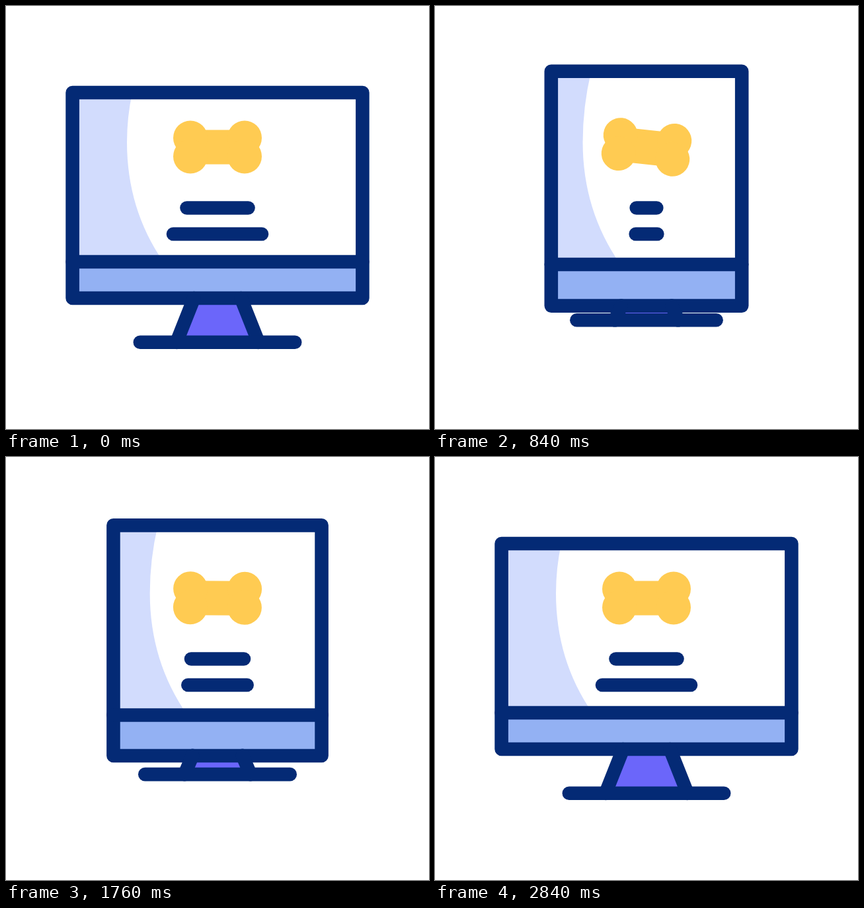
Write an HTML page with a canvas that moves like this. It is 640 px wide and 640 px high and loops after 3000 ms.

```html
<!DOCTYPE html>
<html lang="en">
<head>
<meta charset="utf-8">
<title>Responsive screen</title>
<style>
  html, body { margin: 0; width: 100%; height: 100%; overflow: hidden; background: #fff; }
  canvas { display: block; width: 640px; height: 640px; }
</style>
</head>
<body>
<canvas id="stage" width="640" height="640"></canvas>
<script>
const ctx = document.getElementById('stage').getContext('2d');
const LOOP = 3000, STEP = 40, CX = 320, STROKE = 20.6, WAIST_Y = 206;
const NAVY = '#042a75', SHADE = '#d2dcfd', BAR = '#93b1f3', PURPLE = '#6b66fa', YELLOW = '#ffcb52';

const mix = (a, b, k) => a + (b - a) * k;
const smooth = k => k * k * (3 - 2 * k);
const snap = k => k < 0.5 ? (2 * k) ** 2.25 / 2 : 1 - (2 - 2 * k) ** 2.25 / 2;

// Eased progress from 0 to 1 between two times
const span = (t, from, to, ease = smooth) =>
  ease(Math.min(1, Math.max(0, (t - from) / (to - from))));

// Swings 0 → 1 → 0 → 1 …, turning at each given time
function swing(t, ...times) {
  let sum = 0;
  for (let i = 1; i < times.length; i++) {
    sum += (i % 2 ? 1 : -1) * span(t, times[i - 1], times[i]);
  }
  return sum;
}

// x values are distances from the centre line, except the shaded edge
const desktop = {
  half: 219.4, top: 131, mid: 387, bottom: 442,
  baseHalf: 117.2, baseY: 508.8, legTop: 35.5, legEnd: 62,
  edgeTop: 191, edgeWaist: 183, edgeLow: 238
};
const phone = {
  half: 99.8, top: 83.2, mid: 393, bottom: 459.2,
  baseHalf: 92, baseY: 459.2, legTop: 39.5, legEnd: 41,
  edgeTop: 258, edgeWaist: 243, edgeLow: 301
};

function poseAt(t) {
  const stretch = span(t, 200, 560) - span(t, 2130, 2840);
  const morph = span(t, 558, 1038, snap) - span(t, 1460, 2130);
  const wide = { ...desktop, half: desktop.half + 17.3 * stretch, baseHalf: desktop.baseHalf + 16.8 * stretch };
  const pose = {};
  for (const k in wide) pose[k] = mix(wide[k], phone[k], morph);
  return pose;
}

function line(x0, y0, x1, y1) {
  ctx.beginPath();
  ctx.moveTo(x0, y0);
  ctx.lineTo(x1, y1);
  ctx.stroke();
}

const bar = (half, y) => line(CX - half, y, CX + half, y);

function drawScreen(s) {
  const left = CX - s.half;
  ctx.fillStyle = SHADE;
  ctx.beginPath();
  ctx.moveTo(left, s.top);
  ctx.lineTo(s.edgeTop, s.top);
  ctx.quadraticCurveTo(s.edgeWaist, (s.top + WAIST_Y) / 2, s.edgeWaist, WAIST_Y);
  ctx.quadraticCurveTo(s.edgeWaist, (s.mid + WAIST_Y) / 2 + 11, s.edgeLow, s.mid);
  ctx.lineTo(left, s.mid);
  ctx.fill();
  ctx.fillStyle = BAR;
  ctx.fillRect(left, s.mid, s.half * 2, s.bottom - s.mid);
}

function drawFrame(s) {
  ctx.fillStyle = PURPLE;
  ctx.beginPath();
  ctx.moveTo(CX - s.legTop, s.bottom);
  ctx.lineTo(CX + s.legTop, s.bottom);
  ctx.lineTo(CX + s.legEnd, s.baseY);
  ctx.lineTo(CX - s.legEnd, s.baseY);
  ctx.fill();
  ctx.strokeRect(CX - s.half, s.top, s.half * 2, s.bottom - s.top);
  bar(s.half, s.mid);
  for (const side of [-1, 1]) {
    line(CX + side * s.legTop, s.bottom, CX + side * s.legEnd, s.baseY);
  }
  bar(s.baseHalf, s.baseY);
}

function drawBone(degrees) {
  ctx.save();
  ctx.translate(CX, 213.5);
  ctx.rotate(degrees * Math.PI / 180);
  ctx.fillStyle = YELLOW;
  ctx.fillRect(-41, -26, 82, 52);
  for (const x of [-41, 41]) {
    for (const y of [-14, 14]) {
      ctx.beginPath();
      ctx.arc(x, y, 26, 0, Math.PI * 2);
      ctx.fill();
    }
  }
  ctx.restore();
}

function draw(t) {
  const pose = poseAt(t);
  ctx.fillStyle = '#fff';
  ctx.fillRect(0, 0, 640, 640);
  ctx.strokeStyle = NAVY;
  ctx.lineWidth = STROKE;
  ctx.lineCap = ctx.lineJoin = 'round';
  drawScreen(pose);
  drawFrame(pose);
  drawBone(7 * (span(t, 560, 920) - span(t, 2050, 2560)) - 11.5 * swing(t, 920, 1520, 2050));
  bar(46.5 * (1 - 0.8 * swing(t, 400, 990, 1600, 2200, 2840)), 305.5);
  bar(67 * (1 - 0.8 * swing(t, 225, 942, 1466, 2128, 2590)), 345);
}

const start = performance.now();
function tick() {
  const t = (performance.now() - start) % LOOP;
  draw(Math.floor(t / STEP) * STEP);
  requestAnimationFrame(tick);
}
tick();
</script>
</body>
</html>
```
